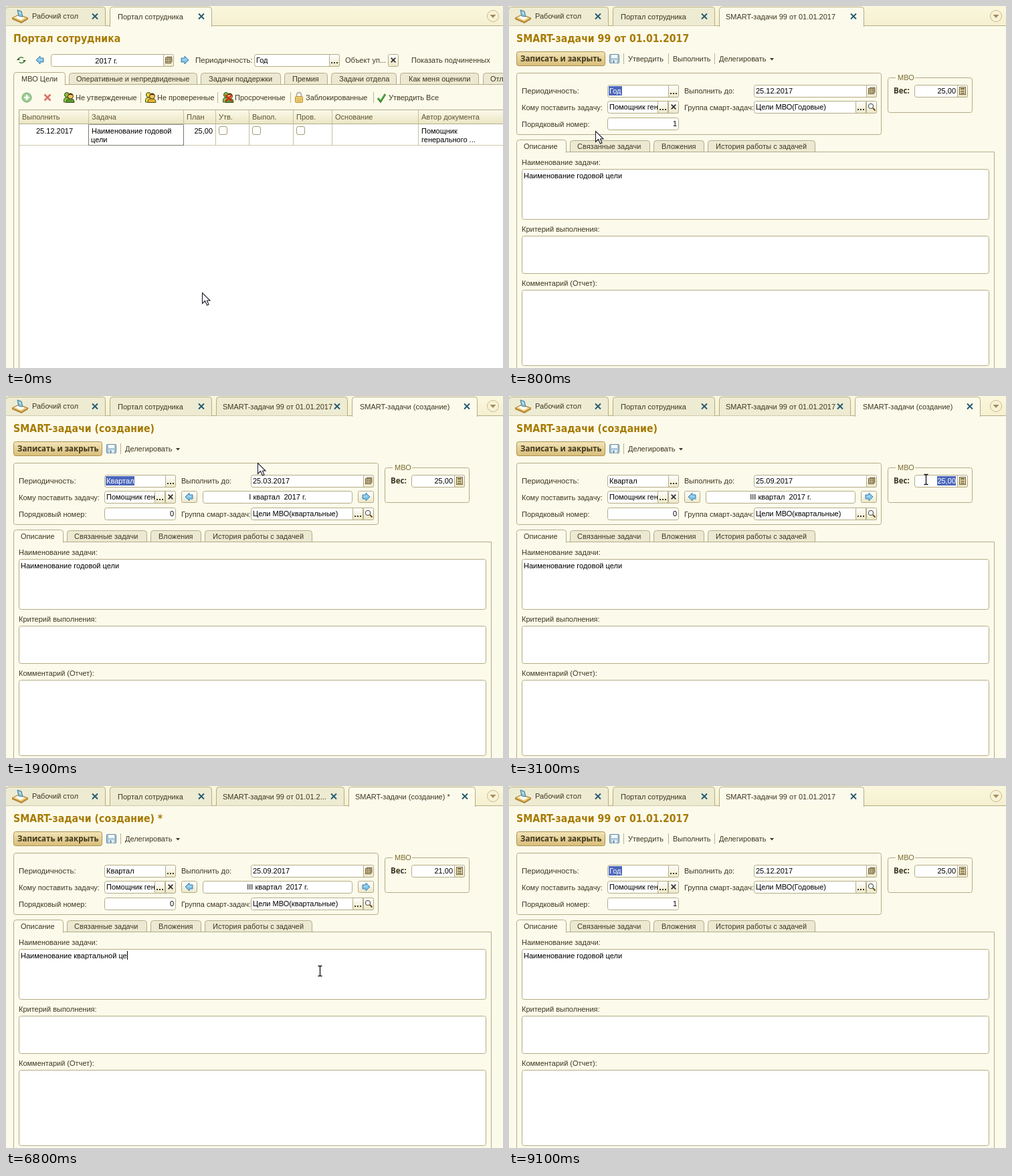
These frames come from a looping animation (743 px wide and 542 px high, 9800 ms). An HTML page:

```html
<!DOCTYPE html>
<html lang="ru">
<head>
<meta charset="utf-8">
<title>SMART-задачи</title>
<style>
html, body { margin: 0; width: 100%; height: 100%; overflow: hidden; background: #fcfaeb; }
svg { display: block; font: 11px "Liberation Sans", Arial, sans-serif; }
text { white-space: pre; }
.bold { font-family: "Noto Sans", sans-serif; font-weight: 700; }
.title { font: 700 15.7px "DejaVu Sans Condensed", "Noto Sans", sans-serif; }
</style>
</head>
<body>
<svg id="stage" width="743" height="542" viewBox="0 0 743 542">
  <defs>
    <linearGradient id="head" x2="0" y2="1"><stop stop-color="#fbf9e9"/><stop offset="1" stop-color="#ebe6c6"/></linearGradient>
    <linearGradient id="gold" x2="0" y2="1"><stop stop-color="#f4e6bb"/><stop offset=".5" stop-color="#e6d096"/><stop offset="1" stop-color="#d8bd7a"/></linearGradient>
    <linearGradient id="hot" x2="0" y2="1"><stop stop-color="#fff3cd"/><stop offset="1" stop-color="#ecce80"/></linearGradient>
    <linearGradient id="btn" x2="0" y2="1"><stop stop-color="#fff"/><stop offset="1" stop-color="#ece7c8"/></linearGradient>
    <linearGradient id="cool" x2="0" y2="1"><stop stop-color="#f3f9ff"/><stop offset="1" stop-color="#bcd9f5"/></linearGradient>
    <linearGradient id="strip" x2="0" y2="1"><stop stop-color="#fbf7dd"/><stop offset="1" stop-color="#f5f0d0"/></linearGradient>
  </defs>
  <g id="scene"></g>
</svg>
<script>
const LOOP = 9800, STEP = 100;
const BG = '#fcfaeb', LINE = '#b3ac86', LABEL = '#3d3720', TITLE = '#a67a00';
const scene = document.getElementById('scene');
const pen = document.createElement('canvas').getContext('2d');
pen.font = '11px "Liberation Sans", Arial, sans-serif';

// Basic shapes
const text = (x, y, s, fill = LABEL, more = '') => `<text x="${x}" y="${y}" fill="${fill}" ${more}>${s}</text>`;
const bold = (x, y, s) => text(x, y, s, LABEL, 'class="bold" font-size="11.500"');
const title = s => text(11, 54, s, TITLE, 'class="title"');
const rect = (x, y, w, h, fill, stroke = 'none', r = 0, more = '') =>
  `<rect x="${x}" y="${y}" width="${w}" height="${h}" rx="${r}" fill="${fill}" stroke="${stroke}" ${more}/>`;
const path = (d, stroke, width = 1, fill = 'none') => `<path d="${d}" fill="${fill}" stroke="${stroke}" stroke-width="${width}"/>`;
const dot = (x, y, r, fill, stroke = 'none') => `<circle cx="${x}" cy="${y}" r="${r}" fill="${fill}" stroke="${stroke}"/>`;
const at = (x, y, body) => `<g transform="translate(${x} ${y})">${body}</g>`;
const sep = (x, y) => path(`M${x}.5 ${y - 8}v16`, '#bab38f');
const cross = (x, y, r, color, w) => path(`M${x - r} ${y - r}l${2 * r} ${2 * r}m0 ${-2 * r}l${-2 * r} ${2 * r}`, color, w);

// Icons, drawn around their centre
const arrow = (x, y, dir) => at(x, y, `<g transform="scale(${dir} 1)">` +
  path('M6 0L0-6V-3H-5V3H0V6Z', '#3c7fae', 1, '#82c4ea') + path('M-3-1H2', '#c9ebfb') + '</g>');
const person = (x, y, back, front) => at(x, y,
  path('M-7.500 7V3Q-7 0-3 0H0V7Z', '#3b5a1c', 1, back) + dot(-3, -4, 3.500, back, '#2f3a14') +
  path('M-4 7.500Q-4 2 0 2H4Q8 2 8 7.500Z', '#4d4a20', 1, front) + dot(2.500, -2, 4, '#f0c45c', '#5a3f12') +
  path('M-1.500-3Q2.500-10 6.500-3Q2.500-5-1.500-3Z', 'none', 0, '#4a3010'));
const plus = at(31, 137, dot(0, 0, 7, '#9ccd94', '#6ea868') + path('M-4 0H4M0-4V4', '#fff', 2.600));
const lock = at(438, 137, path('M-3.500-1V-4A3.500 3.500 0 0 1 3.500-4V-1', '#b5b5ae', 2) +
  rect(-5.500, -1.500, 11, 9, '#f1cf72', '#b98e35', 1) + path('M-4 2H4M-4 5H4', '#d3a746'));
const check = path('M556 138l4 5l7-11', '#3a8a2c', 3) + path('M556 137.500l4 4l6-9', '#6cc251', 1);
const refresh = at(23, 81, path('M-4.500-1A4.500 4.500 0 0 1 3-3M4.500 1A4.500 4.500 0 0 1-3 3', '#3f7d38', 1.500) +
  path('M2 0h5l-2.500 3ZM-2 0h-5l2.500-3Z', 'none', 0, '#2c6528'));
const disk = at(157.500, 79, rect(-7, -6.500, 14, 13, '#a9c4d6', '#5f87a1', 1) +
  rect(-4.500, -6, 9, 5, '#f4f9fc') + rect(-4, 1.500, 8, 5, '#e4edf2') + rect(-2, 2.500, 2, 4, '#5f87a1'));
const desk = at(20, 15, path('M-11 3L-1-2L13 3L3 9Z', '#a37d37', 1, '#efc96f') + path('M-11 3V5L3 11L13 5V3L3 9Z', 'none', 0, '#b48a3c') +
  path('M-7 2L0-1L8 3L2 6Z', 'none', 0, '#fff') + path('M-3-9L3-7L5 1L-1 0Z', '#417f9c', 1, '#8cc6d8') + path('M0-6L2-3', '#fff'));
const glyphs = {
  dots: [-4, 0, 4].map(x => rect(x - 1, 3, 2, 2, '#3d3720')).join(''),
  x: cross(0, 0, 3.300, '#333', 1.800),
  grid: rect(-4.500, -3.500, 8, 8, '#fff8df', '#6b5a2c') + path('M-4-1H4M-4 2H4M-2-3V4M1-3V4', '#6b5a2c') + path('M-3-5H5V3', '#6b5a2c'),
  calc: rect(-4.500, -5.500, 9, 11, '#f5e9c4', '#6b5a2c') + rect(-3, -4, 6, 2, '#6b5a2c') + path('M-3 .5H3M-3 3.500H3', '#6b5a2c', 1.500),
  lens: dot(-1, -1, 3.700, '#f0f7fa', '#444') + path('M2 2l3.500 3.500', '#6e4c12', 2)
};

// Controls
const button = (x, y, w, h, glyph, fill = 'url(#btn)') =>
  rect(x + .5, y + .5, w - 1, h - 1, fill, LINE, 2) + at(x + w / 2, y + Math.floor(h / 2), glyph);

function field(x, y, w, s, { anchor = 'start', pad = 3, icons = [], marked = 0 } = {}) {
  const right = x + w - 16 * icons.length;
  const tx = { start: x + pad, middle: x + w / 2, end: right - pad }[anchor];
  const mark = marked && rect(anchor === 'end' ? tx - marked : tx - 1, y + 2, marked, 14, '#4c68bb');
  return rect(x + .5, y + .5, w - 1, 18, '#fff', LINE, 3) + (mark || '') +
    text(tx, y + 13, s, marked ? '#fff' : '#000', `text-anchor="${anchor}"`) +
    icons.map((k, i) => button(right + 16 * i, y, 16, 19, glyphs[k])).join('');
}

const tabShape = (x, w, top, base, fill, r) =>
  path(`M${x + .5} ${base}V${top + r}q0-${r} ${r}-${r}h${w - 2 * r}q${r} 0 ${r} ${r}V${base}`, LINE, 1, fill);

function pageTabs(list, y, right) {
  const base = y + 18.500;
  return path(`M11.500 560V${base}H${right}.5V560`, LINE) + list.map(([x, w, tx, s], i) =>
    tabShape(x, w, y + (i ? 1.5 : .5), i ? base : base + 1, i ? '#ece9d2' : BG, 4) + text(tx, y + 14, s)).join('') +
    list.slice(1).map(([x, w]) => path(`M${x} ${base}h${w + 1}`, LINE)).join('');
}

function windowTabs(list) {
  const last = list.length - 1;
  return rect(0, 0, 743, 30, 'url(#strip)') + path('M0 29.500H743', LINE) +
    list.map(([x, end, tx, s], i) => tabShape(x, end - x, 1.500, i < last ? 29.500 : 31, i < last ? '#eeebd3' : BG, 4) +
      text(tx, i ? 20 : 19, s) + cross(end - 15, 15.500, 4, '#245a70', 1.900)).join('') + desk +
    dot(728, 15, 8.500, '#f8f2d6', '#c8bb90') + path('M723.500 13h9l-4.500 5Z', 'none', 0, '#a08e58');
}

// List of tasks
function listPage(picked) {
  const columns = [[19, 'Выполнить'], [123, 'Задача'], [265, 'План'], [313, 'Утв.'], [363, 'Выпол.'],
    [429, 'Пров.'], [487, 'Основание'], [616, 'Автор документа']];
  const tools = [[104, 'Не утвержденные'], [226, 'Не проверенные'], [342, 'Просроченные'], [448, 'Заблокированные'], [572, 'Утвердить Все']];
  const tabs = [[11, 77, 23, 'МВО Цели'], [94, 191, 105, 'Оперативные и непредвиденные'], [291, 119, 303, 'Задачи поддержки'],
    [416, 64, 428, 'Премия'], [486, 97, 498, 'Задачи отдела'], [589, 117, 602, 'Как меня оценили'], [713, 60, 724, 'Отличия']];
  return title('Портал сотрудника') + refresh + arrow(51, 81, -1) +
    field(67, 72, 184, '') + text(150, 86, '2017 г.', '#000', 'text-anchor="middle"') + button(235, 72, 16, 19, glyphs.grid) +
    arrow(267, 81, 1) + text(283, 85, 'Периодичность:', LABEL, 'font-size="11.500"') +
    field(371, 72, 128, 'Год', { icons: ['dots'] }) + text(507, 85, 'Объект уп...') +
    button(571, 72, 16, 19, glyphs.x) + text(606, 85, 'Показать подчиненных') +
    pageTabs(tabs, 99, 760) + plus + cross(62, 137, 4.500, '#de7065', 2.600) +
    person(94, 137, '#8cc63f', '#4f9d2c') + person(216, 137, '#f2d54a', '#e2b62c') + person(332, 137, '#8cc63f', '#4f9d2c') +
    cross(333, 138, 5, '#d5281f', 2.400) +
    lock + check + [201, 316, 425, 549].map(x => sep(x, 137)).join('') + tools.map(([x, s]) => text(x, 141, s)).join('') +
    rect(19.500, 155.500, 740, 400, '#fff', LINE) + rect(20, 156, 723, 20, 'url(#head)') + path('M20 176.500H743', LINE) +
    (picked ? rect(20, 177, 723, 31, '#fff0c2') : '') + path('M20 208.500H743', '#cfcaae') +
    columns.map(([x, s], i) => (i ? path(`M${x}.5 156V208`, '#c6c09f') : '') + text(x + 5, 170, s, '#5f5632')).join('') +
    text(45, 191, '25.12.2017', '#000') + text(128, 191, 'Наименование годовой', '#000') + text(127, 204, 'цели', '#000') +
    text(309, 191, '25,00', '#000', 'text-anchor="end"') + text(621, 191, 'Помощник', '#000') + text(621, 204, 'генерального ...', '#000') +
    rect(123.500, 177.500, 142, 31, 'none', '#333', 0, 'stroke-dasharray="1 1" stroke-dashoffset=".5"') +
    [318, 368, 434].map(x => rect(x + .5, 180.500, 12, 12, '#fff', '#a39b73', 2.500)).join('');
}

// Task form, shared by the saved and the new task
function formPage(f) {
  const menuX = f.fresh ? 178 : 314, groupY = f.fresh ? 167 : 142;
  const tabs = [[11, 74, 22, 'Описание'], [91, 119, 102, 'Связанные задачи'], [216, 75, 228, 'Вложения'], [297, 160, 309, 'История работы с задачей']];
  const areas = [[244, 76, 'Наименование задачи:'], [344, 57, 'Критерий выполнения:'], [425, 114, 'Комментарий (Отчет):']];
  const caretX = Math.round(22 + pen.measureText(f.name).width) + .5;
  return title(f.title) +
    rect(11.500, 68.500, 132, 21, f.hot === 'save' ? 'url(#hot)' : 'url(#gold)', '#ab9351', 3) + bold(17, 83, 'Записать и закрыть') + disk + sep(171, 79) +
    (f.fresh ? '' : text(178, 83, 'Утвердить') + sep(238, 79) + text(245, 83, 'Выполнить') + sep(307, 79)) +
    (f.hot === 'menu' ? rect(309.500, 68.500, 91, 21, 'url(#hot)', LINE, 3) : '') +
    text(menuX, 83, 'Делегировать') + path(`M${menuX + 76} 78h6l-3 3.500Z`, 'none', 0, '#333') +
    rect(11.500, 100.500, 545, 92, 'none', LINE, 3) + rect(566.500, 107.500, 126, 52, 'none', LINE, 3) +
    rect(578, 104, 29, 8, BG) + text(581, 111, 'МВО', '#7a6a2c') +
    text(19, 131, 'Периодичность:', LABEL, 'font-size="11.500"') + text(19, 156, 'Кому поставить задачу:') + text(19, 181, 'Порядковый номер:') +
    field(147, 118, 107, f.period, { icons: ['dots'], marked: f.periodMark }) +
    field(147, 142, 107, 'Помощник ген', { icons: ['dots', 'x'] }) +
    field(147, 167, 107, f.number, { anchor: 'end' }) +
    text(262, 131, 'Выполнить до:') + field(366, 118, 184, f.due, { icons: ['grid'] }) +
    (f.fresh ? button(262, 142, 24, 18, arrow(0, 0, -1), f.hot === 'prev' ? 'url(#cool)' : undefined) +
      field(294, 142, 224, f.quarter + ' квартал  2017 г.', { anchor: 'middle' }) +
      button(526, 142, 24, 18, arrow(0, 0, 1), f.hot === 'next' ? 'url(#cool)' : undefined) : '') +
    text(262, groupY + 14, 'Группа смарт-задач:') + field(366, groupY, 184, f.group, { icons: ['dots', 'lens'] }) +
    bold(575, 131, 'Вес:') + field(606, 118, 80, f.weight, { anchor: 'end', pad: 2, icons: ['calc'], marked: f.weightMark }) +
    pageTabs(tabs, 200, 725) +
    areas.map(([y, h, s]) => text(19, y - 6, s) + rect(19.500, y + .5, 698, h - 1, '#fff', LINE, 3)).join('') +
    text(22, 258, f.name, '#000') + (f.caret ? path(`M${caretX} 247V260`, '#000') : '');
}

// Timeline
const pick = (keys, t) => keys.filter(k => k[0] <= t).pop()[1];
const YEAR_GOAL = 'Наименование годовой цели', BASE = 'Наименование ';
const names = [[0, YEAR_GOAL], [5100, BASE + 'годовой '], [5200, BASE + 'годо'], [5300, BASE], [6000, BASE + 'кварт'],
  [6300, BASE + 'квартальной '], [6800, BASE + 'квартальной це'], [7000, BASE + 'квартальной цели']];
const hovers = [[0, ''], [1400, 'menu'], [1800, ''], [2500, 'next'], [3000, ''], [8200, 'prev'], [8300, ''], [8500, 'save'], [9100, '']];
const moves = [[0, 293, 429], [500, 129, 187], [1000, 129, 187], [1500, 350, 78], [1700, 350, 78], [1900, 376, 100], [2200, 376, 100],
  [2500, 536, 150], [2900, 536, 150], [3100, 623, 124], [4300, 623, 124], [4600, 469, 276], [8100, 469, 276], [8200, 263, 152], [8500, 82, 78]];

function cursor(t) {
  if (t >= 9100) return '';
  const i = moves.findIndex(m => m[0] > t);
  let [, x, y] = moves[i < 0 ? moves.length - 1 : i - 1];
  if (i > 0) {
    const [t0] = moves[i - 1], [t1, x1, y1] = moves[i];
    const k = (t - t0) / (t1 - t0), e = k * k * (3 - 2 * k);
    x = Math.round(x + (x1 - x) * e);
    y = Math.round(y + (y1 - y) * e);
  }
  const beam = t >= 3100 && t < 4400 || t >= 4600 && t < 8200;
  return at(x + .5, y + .5, beam ? path('M-3-7H-1L0-6L1-7H3M0-6V7M-3 8H-1L0 7L1 8H3', '#111', 1.300)
    : path('M0 0V16L4 12L7 18.500L9.500 17.500L7 11.500H11.500Z', '#1a1a2c', 1.100, '#fff'));
}

function draw(t) {
  const fresh = t >= 1800 && t < 9100, edited = fresh && t >= 4600;
  const tabs = [[-1, 148, 39, 'Рабочий стол'], [155, 307, 167, 'Портал сотрудника']];
  const saved = 'SMART-задачи 99 от 01.01.2017', star = edited ? ' *' : '';
  if (t >= 800) tabs.push([314, edited ? 505 : fresh ? 510 : 530, 324, edited ? saved.slice(0, -3) + '...' : saved]);
  if (fresh) tabs.push(edited ? [512, 701, 522, 'SMART-задачи (создание) *'] : [517, 704, 529, 'SMART-задачи (создание)']);
  const n = t < 2500 ? 1 : t < 2800 ? 2 : 3;
  const form = fresh ? {
    title: 'SMART-задачи (создание)' + star, period: 'Квартал', periodMark: t < 2500 ? 43 : 0, number: '0',
    due: `25.0${n * 3}.2017`, quarter: 'I'.repeat(n), group: 'Цели МВО(квартальные)',
    weight: t < 4000 ? '25,00' : t < 4200 ? '2,00' : '21,00', weightMark: t >= 3100 && t < 4000 ? 28 : 0,
    name: pick(names, t), caret: t >= 4600 && t < 7500
  } : {
    title: saved, period: 'Год', periodMark: 20, number: '1', due: '25.12.2017',
    group: 'Цели МВО(Годовые)', weight: '25,00', name: YEAR_GOAL
  };
  scene.innerHTML = rect(0, 0, 743, 542, BG) + windowTabs(tabs) +
    (t < 800 ? listPage(t >= 500) : formPage({ ...form, fresh, hot: pick(hovers, t) })) + cursor(t);
}

let shown = -1;
function tick(now) {
  const t = Math.floor(now % LOOP / STEP) * STEP;
  if (t !== shown) draw(shown = t);
  requestAnimationFrame(tick);
}
tick(performance.now());
</script>
</body>
</html>
```
